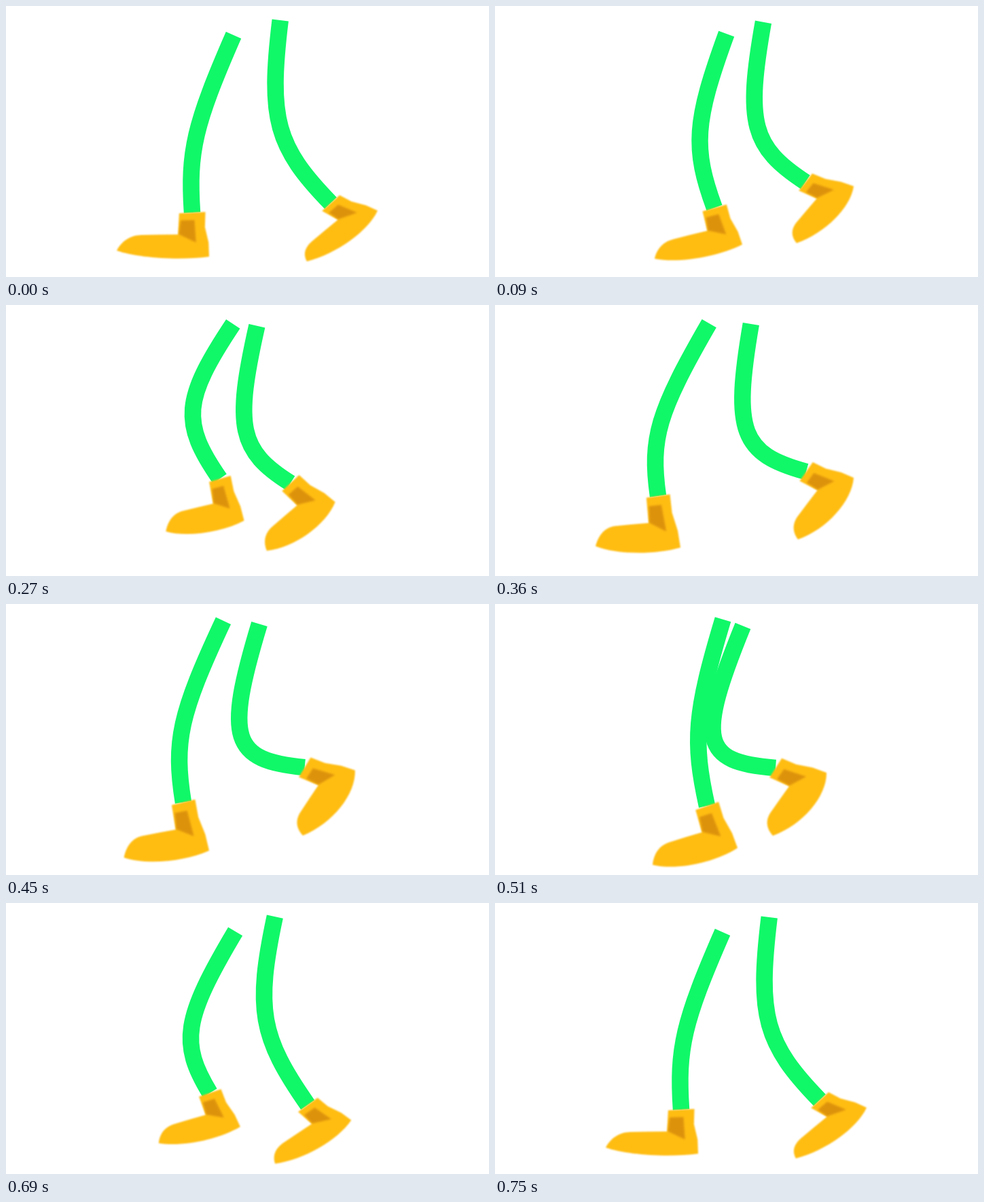
Write an HTML page with a canvas that moves like this. It is 711 px wide and 400 px high and loops after 780 ms.

```html
<!DOCTYPE html>
<html>
<head>
<meta charset="utf-8">
<style>
html, body { margin: 0; height: 100%; overflow: hidden; background: #fff; }
canvas { display: block; }
</style>
</head>
<body>
<canvas id="stage" width="711" height="400"></canvas>
<script>
const ctx = document.getElementById('stage').getContext('2d');
const CYCLE = 750, LOOP = 780, STEP = 30;
const GREEN = '#10f868', YELLOW = '#ffbd12', SHADE = '#dd920c';

// Cosine that peaks at the given time of the walk cycle.
const wave = (t, peak = 0) => Math.cos(2 * Math.PI * (t - peak) / CYCLE);

// Each hip sways; key poses give knee, cuff, heel and toe (x, y each) by time.
const farLeg = {
  hip: t => [356 - 21 * wave(t), 35.5 + 7.5 * wave(t)],
  keys: {
    0: [267, 199, 274, 305, 299, 370, 163, 361],
    90: [285, 194, 323, 298, 364, 352, 235, 373],
    210: [312, 202, 383, 276, 444, 317, 330, 373],
    360: [345, 215, 458, 246, 528, 255, 446, 346],
    510: [284, 232, 413, 242, 488, 249, 409, 342],
    630: [237, 193, 341, 254, 408, 285, 307, 349]
  }
};
const nearLeg = {
  hip: t => [359 + 45 * wave(t, 13), 24 + 4 * wave(t, 285)],
  keys: {
    0: [383, 193, 478, 291, 547, 302, 443, 377],
    90: [364, 199, 457, 260, 528, 266, 444, 350],
    210: [268, 153, 364, 245, 405, 294, 298, 326],
    360: [226, 182, 240, 282, 273, 358, 148, 356],
    390: [205, 187, 218, 286, 250, 364, 125, 361],
    510: [287, 185, 312, 298, 357, 360, 232, 385],
    630: [333, 170, 398, 300, 456, 336, 338, 388]
  }
};

// Cyclic cubic interpolation between uneven key times.
function poseAt(keys, t) {
  const times = Object.keys(keys).map(Number), n = times.length;
  const time = i => times[(i + n) % n] + CYCLE * Math.floor(i / n);
  const pose = i => keys[times[(i + n) % n]];
  const i = times.findLastIndex(k => k <= t);
  const span = time(i + 1) - time(i), u = (t - time(i)) / span;
  const slope = (k, j) => (pose(k + 1)[j] - pose(k - 1)[j]) / (time(k + 1) - time(k - 1)) * span;
  return pose(i).map((a, j) => {
    const b = pose(i + 1)[j], m = slope(i, j), w = slope(i + 1, j);
    return a + u * (m + u * (3 * (b - a) - 2 * m - w + u * (2 * (a - b) + m + w)));
  });
}

const mix = (a, b, u) => a.map((v, k) => v + (b[k] - v) * u);

function drawLeg({ hip: hipAt, keys }, t) {
  const v = poseAt(keys, t), hip = hipAt(t);
  const [knee, cuff, heel, toe] = [0, 2, 4, 6].map(i => v.slice(i, i + 2));

  ctx.beginPath();
  ctx.moveTo(...hip);
  ctx.bezierCurveTo(...mix(hip, knee, .85), ...mix(cuff, knee, .85), ...cuff);
  ctx.lineWidth = 24.5;
  ctx.strokeStyle = GREEN;
  ctx.stroke();

  // Boot coordinates: a runs from heel to toe, b from heel to cuff.
  const at = (a, b) => [0, 1].map(k => heel[k] + a * (toe[k] - heel[k]) + b * (cuff[k] - heel[k]));
  const lines = list => list.forEach(p => ctx.lineTo(...at(...p)));

  // The sole bulges more as the foot tips onto its toe.
  const sole = -.16 - .0023 * (toe[1] - heel[1]);
  ctx.filter = 'blur(0.9px)';
  ctx.fillStyle = YELLOW;
  ctx.beginPath();
  lines([[.147, .964], [-.15, 1.036], [-.08, .68], [-.055, .33], [0, 0]]);
  ctx.bezierCurveTo(...at(.35, sole), ...at(.8, sole), ...toe);
  ctx.bezierCurveTo(...at(.88, .28), ...at(.76, .38), ...at(.66, .4));
  ctx.quadraticCurveTo(...at(.45, .44), ...at(.25, .47));
  ctx.fill();

  ctx.filter = 'blur(1.8px)';
  ctx.fillStyle = SHADE;
  ctx.beginPath();
  lines([[.16, .8], [.006, .83], [.085, .31], [.24, .475]]);
  ctx.fill();
  ctx.filter = 'none';
}

const start = performance.now();
function draw() {
  const t = Math.floor((performance.now() - start) % LOOP / STEP) * STEP % CYCLE;
  ctx.clearRect(0, 0, 711, 400);
  drawLeg(farLeg, t);
  drawLeg(nearLeg, t);
  requestAnimationFrame(draw);
}
draw();
</script>
</body>
</html>
```
